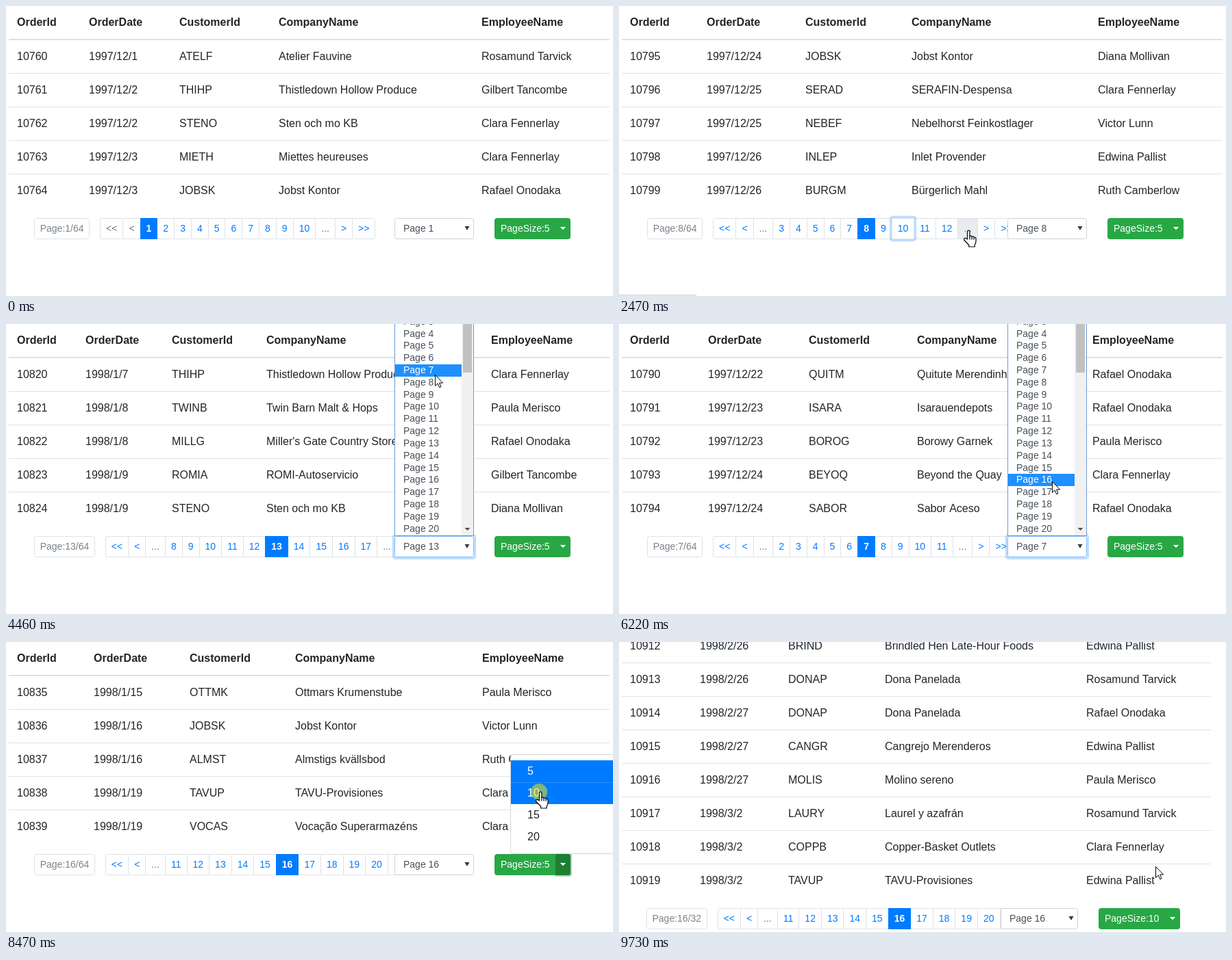
Recreate the animation shown at these times as an HTML page with a canvas. Size 886 by 424 pixels, loop 9.97 s.

```html
<!DOCTYPE html>
<html lang="en">
<head>
<meta charset="utf-8">
<title>Paged order table</title>
<style>
html, body { margin: 0; width: 100%; height: 100%; overflow: hidden; background: #fff; }
canvas { display: block; }
</style>
</head>
<body>
<canvas id="stage" width="886" height="424"></canvas>
<script>
const ctx = document.getElementById('stage').getContext('2d');
const LOOP = 9970;
const FONT = '"Liberation Sans", Arial, sans-serif';
const BLUE = '#007bff', LINE = '#dee2e6', INK = '#212529', GRAY = '#6c757d', FIELD = '#495057';

const STAFF = {
  R: 'Rosamund Tarvick', G: 'Gilbert Tancombe', C: 'Clara Fennerlay',
  O: 'Rafael Onodaka', E: 'Edwina Pallist', H: 'Ruth Camberlow',
  P: 'Paula Merisco', D: 'Diana Mollivan', V: 'Victor Lunn'
};
const HEADS = ['OrderId', 'OrderDate', 'CustomerId', 'CompanyName', 'EmployeeName'];

// Rows: date, customer code, company, employee key
const VIEWS = {
  p1: { page: 1, first: 10760, cols: [16, 121, 253, 398, 694], rows: [
    '1997/12/1|ATELF|Atelier Fauvine|R',
    '1997/12/2|THIHP|Thistledown Hollow Produce|G',
    '1997/12/2|STENO|Sten och mo KB|C',
    '1997/12/3|MIETH|Miettes heureuses|C',
    '1997/12/3|JOBSK|Jobst Kontor|O'] },
  p5: { page: 5, first: 10780, cols: [16, 122, 258, 405, 692], rows: [
    '1997/12/16|ROMIA|ROMI-Autoservicio|E',
    '1997/12/17|KUUSR|Kuusilan Ruoka|E',
    '1997/12/17|OMBUV|Ombú Viandas para el viaje|H',
    '1997/12/18|TUPIM|Tupira Massas|R',
    '1997/12/18|DISPC|Dispense Casalinghe Vallorti|R'] },
  p7: { page: 7, first: 10790, cols: [16, 130, 277, 435, 691], rows: [
    '1997/12/22|QUITM|Quitute Merendinhas|O',
    '1997/12/23|ISARA|Isarauendepots|O',
    '1997/12/23|BOROG|Borowy Garnek|P',
    '1997/12/24|BEYOQ|Beyond the Quay|C',
    '1997/12/24|SABOR|Sabor Aceso|O'] },
  p8: { page: 8, first: 10795, cols: [16, 128, 272, 427, 699], rows: [
    '1997/12/24|JOBSK|Jobst Kontor|D',
    '1997/12/25|SERAD|SERAFIN-Despensa|C',
    '1997/12/25|NEBEF|Nebelhorst Feinkostlager|V',
    '1997/12/26|INLEP|Inlet Provender|E',
    '1997/12/26|BURGM|Bürgerlich Mahl|H'] },
  p13: { page: 13, first: 10820, cols: [16, 116, 242, 380, 708], rows: [
    '1998/1/7|THIHP|Thistledown Hollow Produce|C',
    '1998/1/8|TWINB|Twin Barn Malt & Hops|P',
    "1998/1/8|MILLG|Miller's Gate Country Storehouses|O",
    '1998/1/9|ROMIA|ROMI-Autoservicio|G',
    '1998/1/9|STENO|Sten och mo KB|D'] },
  p16: { page: 16, first: 10835, cols: [16, 128, 268, 422, 695], rows: [
    '1998/1/15|OTTMK|Ottmars Krumenstube|P',
    '1998/1/16|JOBSK|Jobst Kontor|V',
    '1998/1/16|ALMST|Almstigs kvällsbod|H',
    '1998/1/19|TAVUP|TAVU-Provisiones|C',
    '1998/1/19|VOCAS|Vocação Superarmazéns|C'] },
  p16x10: { page: 16, first: 10910, size: 10, cols: [16, 118, 247, 388, 682], rows: [
    '1998/2/26|SAIMK|Saimen Keitto|P',
    '1998/2/26|MOROF|Moros Fogón Casero|C',
    '1998/2/26|BRIND|Brindled Hen Late-Hour Foods|E',
    '1998/2/26|DONAP|Dona Panelada|R',
    '1998/2/27|DONAP|Dona Panelada|O',
    '1998/2/27|CANGR|Cangrejo Merenderos|E',
    '1998/2/27|MOLIS|Molino sereno|P',
    '1998/3/2|LAURY|Laurel y azafrán|R',
    '1998/3/2|COPPB|Copper-Basket Outlets|C',
    '1998/3/2|TAVUP|TAVU-Provisiones|E'] }
};

// Each step changes part of the state and holds until the next
const START = { view: 'p1', cur: null, ring: -1, status: 0, focus: false, list: false, menu: false, scroll: 0 };
const STEPS = [
  [250, { cur: ['arrow', 300, 392] }],
  [490, { cur: ['hand', 308, 328], status: 1 }],
  [740, { cur: ['click', 308, 326], ring: 6 }],
  [980, { view: 'p5', cur: ['hand', 308, 326] }],
  [1230, { cur: ['hand', 340, 328] }],
  [1470, { cur: ['hand', 382, 326] }],
  [1730, { cur: ['click', 383, 325], ring: 9 }],
  [1980, { view: 'p8', cur: ['hand', 383, 325], ring: 10 }],
  [2230, { cur: ['arrow', 440, 352] }],
  [2470, { cur: ['hand', 508, 328] }],
  [2730, { cur: ['click', 510, 326], ring: 13 }],
  [2980, { view: 'p13', cur: ['hand', 510, 326] }],
  [3230, { cur: ['arrow', 590, 330] }],
  [3470, { cur: ['arrow', 646, 333], status: .4 }],
  [3730, { cur: ['arrow', 648, 325], ring: -1, status: 0, focus: true, list: true }],
  [3960, { cur: ['arrow', 640, 239] }],
  [4230, { cur: ['arrow', 630, 130] }],
  [4460, { cur: ['arrow', 626, 74] }],
  [4730, { view: 'p7', list: false }],
  [4980, { cur: ['arrow', 634, 170] }],
  [5230, { cur: ['arrow', 645, 321] }],
  [5480, { list: true }],
  [5720, { cur: ['arrow', 641, 290] }],
  [5980, { cur: ['arrow', 634, 246] }],
  [6220, { cur: ['arrow', 632, 230] }],
  [6470, { view: 'p16', list: false }],
  [6720, { cur: ['arrow', 655, 290] }],
  [6970, { cur: ['arrow', 690, 336] }],
  [7210, { cur: ['arrow', 745, 336] }],
  [7460, { cur: ['hand', 808, 328] }],
  [7710, { cur: ['click', 812, 326], focus: false, menu: true }],
  [7960, { cur: ['hand', 806, 290] }],
  [8210, { cur: ['hand', 782, 228] }],
  [8470, { cur: ['click', 778, 219] }],
  [8720, { view: 'p16x10', cur: ['arrow', 778, 219], menu: false }],
  [8960, { cur: ['arrow', 780, 260] }],
  [9200, { cur: ['arrow', 782, 300], scroll: 100 }],
  [9470, { scroll: 166 }],
  [9730, { cur: ['arrow', 783, 328] }]
];

function stateAt(t) {
  const s = { ...START };
  for (const [at, change] of STEPS) if (t >= at) Object.assign(s, change);
  return s;
}

function text(str, x, y, color = INK, size = 16, bold = false) {
  ctx.font = `${bold ? 'bold ' : ''}${size}px ${FONT}`;
  ctx.fillStyle = color;
  ctx.fillText(str, x, y);
}

function width(str) {
  ctx.font = `14px ${FONT}`;
  return ctx.measureText(str).width;
}

function rect(x, y, w, h, color) {
  ctx.fillStyle = color;
  ctx.fillRect(x, y, w, h);
}

function box(x, y, w, h, fill, border, radius = 0) {
  ctx.beginPath();
  ctx.roundRect(x + .5, y + .5, w - 1, h - 1, radius);
  ctx.fillStyle = fill;
  ctx.fill();
  ctx.lineWidth = 1;
  ctx.strokeStyle = border;
  ctx.stroke();
}

function glow(x, y, w, h, color, spread = 3.2) {
  ctx.beginPath();
  ctx.roundRect(x - spread / 2, y - spread / 2, w + spread, h + spread, 3);
  ctx.lineWidth = spread;
  ctx.strokeStyle = color;
  ctx.stroke();
}

function caret(x, y, half, h, color) {
  ctx.beginPath();
  ctx.moveTo(x - half, y);
  ctx.lineTo(x + half, y);
  ctx.lineTo(x, y + h);
  ctx.fillStyle = color;
  ctx.fill();
}

function drawTable(v) {
  const w = v.size ? 860 : 877;
  HEADS.forEach((h, i) => text(h, v.cols[i], 29, INK, 16, true));
  rect(4, 48, w, 2, LINE);
  v.rows.forEach((row, i) => {
    const [date, code, company, key] = row.split('|');
    const y = 79 + 49 * i;
    [String(v.first + i), date, code, company, STAFF[key]].forEach((c, k) => text(c, v.cols[k], y));
    if (i) rect(4, 49 + 49 * i, w, 1, LINE);
  });
}

function pagerLabels(page) {
  const from = Math.max(1, page - 5);
  const nums = Array.from({ length: 10 }, (_, i) => String(from + i));
  return ['<<', '<', ...(from > 1 ? ['...'] : []), ...nums, '...', '>', '>>'];
}

function pagerItems(page, x) {
  return pagerLabels(page).map(label => {
    const w = width(label) + 18;
    const left = Math.round(x), right = Math.round(x + w);
    const item = { label, tx: x + 9, x: left, w: right - left };
    x += w - 1;
    return item;
  });
}

function drawItem(it, y, s, v, cursorY) {
  const off = v.page === 1 && it.label[0] === '<';
  const active = it.label === String(v.page);
  const over = s.cur && s.cur[0] !== 'arrow' && !s.menu &&
    s.cur[1] >= it.x && s.cur[1] < it.x + it.w && cursorY >= y && cursorY < y + 31;
  const fill = active ? BLUE : over ? '#e9ecef' : '#fff';
  box(it.x, y, it.w, 31, fill, active ? BLUE : LINE, /<<|>>/.test(it.label) ? 2 : 0);
  const color = active ? '#fff' : off || it.label === '...' ? GRAY : BLUE;
  text(it.label, it.tx, y + 20, color, 14, active);
}

function drawControls(s, v) {
  const big = !!v.size;
  const y = big ? 555 : 310;
  const x = big ? 39.8 : 41;
  const info = `Page:${v.page}/${big ? 32 : 64}`;
  const infoW = width(info) + 18;
  const cursorY = s.cur ? s.cur[2] + s.scroll : -1;
  box(Math.round(x), y, Math.floor(infoW), 31, '#fff', LINE, 3);
  text(info, x + 8.7, y + 20, '#7b838a', 14);

  const items = pagerItems(v.page, x + infoW + 14.2);
  items.forEach(it => drawItem(it, y, s, v, cursorY));
  const active = items.find(it => it.label === String(v.page));
  drawItem(active, y, s, v, cursorY);

  const sx = big ? 557 : 567, sw = big ? 113 : 116;
  box(sx, y, sw, 31, '#fff', s.focus ? '#80bdff' : '#ced4da', 3);
  if (s.focus) glow(sx, y, sw, 31, 'rgba(0,123,255,.25)');
  text('Page ' + v.page, sx + 13, y + 20, FIELD, 14);
  caret(sx + sw - 10, y + 12, 3.5, 6, '#343a40');

  const ringed = items[s.ring];
  if (ringed) {
    drawItem(ringed, y, s, v, cursorY);
    glow(ringed.x, y, ringed.w, 31, 'rgba(0,123,255,.25)');
  }

  const bx = big ? 700 : 713, bw = big ? 119 : 111, tx = bx + bw - 22;
  box(bx, y, bw, 31, '#28a745', '#28a745', 3);
  const overToggle = s.cur && s.cur[0] === 'hand' && s.cur[1] > tx && cursorY > y;
  if (s.menu || overToggle) {
    const c = s.menu ? '#1e7e34' : '#218838';
    box(tx, y, 22, 31, c, c, 2);
    if (s.menu) glow(tx, y, 22, 31, 'rgba(40,167,69,.4)', 2);
  }
  text('PageSize:' + (big ? 10 : 5), bx + 9, y + 20, '#fff', 14);
  caret(bx + bw - 11, y + 13, 4.2, 4.2, '#fff');
}

function drawList(s, v) {
  const pitch = 17.81;
  const rowTop = n => 5.6 + pitch * (n - 4);
  const cy = s.cur[2];
  const hot = cy < 309 ? Math.floor((cy - 5.6) / pitch) + 4 : v.page;
  box(567, -2, 116, 312, '#fff', '#6c9bd2');
  for (let n = 3; n <= 20; n++) {
    const top = Math.round(rowTop(n));
    if (n === hot) rect(568, top, 97, 18, '#1e90ff');
    text('Page ' + n, 580, top + 13, n === hot ? '#fff' : FIELD, 14);
  }
  rect(665, 0, 17, 309, '#f1f1f1');
  rect(667, 0, 13, 71, '#c1c1c1');
  caret(673.5, 298, 4, 4, '#505050');
}

function drawMenu(s) {
  box(736, 164, 162, 146, '#fff', '#d4d4d4', 4);
  const [kind, , cy] = s.cur;
  ['5', '10', '15', '20'].forEach((label, i) => {
    const top = 173 + 32 * i;
    const over = cy >= top && cy < top + 32;
    const blue = i === 0 || (over && kind === 'click');
    if (blue) rect(737, top, 149, 32, BLUE);
    else if (over) rect(737, top, 149, 32, '#f8f9fa');
    if (blue && i) rect(737, top, 149, 1, '#2a8fff');
    text(label, 761, top + 21, blue ? '#fff' : INK);
  });
}

const ARROW = new Path2D('M.5 .5V16.5L4.2 13L6.7 18.8L9 17.8L6.6 12.1H11.6Z');
const HAND = new Path2D('M.5 13V2Q.5 .2 2.2 .2T3.9 2V8.5Q6.4 7.4 7 9.2Q9.5 8.4 10 10.2Q13 9.8 13 12.5V16Q13 19 11.2 21V24H2.7V21.5L-4 14.5Q-5.2 11 -2.3 11.3Z');
const FINGERS = new Path2D('M3.9 8.5V13.5M7 9.2V13.5M10 10.2V13.8');

function drawCursor([kind, x, y]) {
  if (kind === 'click') {
    ctx.beginPath();
    ctx.arc(x, y, 12, 0, Math.PI * 2);
    ctx.fillStyle = 'rgba(255,240,0,.5)';
    ctx.fill();
  }
  ctx.save();
  ctx.translate(x, y);
  const shape = kind === 'arrow' ? ARROW : HAND;
  ctx.fillStyle = '#fff';
  ctx.strokeStyle = '#000';
  ctx.lineWidth = kind === 'arrow' ? 1 : 1.2;
  ctx.lineJoin = 'round';
  ctx.fill(shape);
  ctx.stroke(shape);
  if (kind !== 'arrow') ctx.stroke(FINGERS);
  ctx.restore();
}

function drawStatus(alpha) {
  ctx.globalAlpha = alpha;
  rect(0, 422, 113, 1, '#d0d0d0');
  rect(0, 423, 114, 1, '#f1f1f1');
  ctx.globalAlpha = 1;
}

function draw(t) {
  const s = stateAt(t);
  const v = VIEWS[s.view];
  rect(0, 0, 886, 424, '#fff');
  ctx.save();
  ctx.translate(0, -s.scroll);
  drawTable(v);
  drawControls(s, v);
  ctx.restore();
  if (s.list) drawList(s, v);
  if (s.menu) drawMenu(s);
  drawStatus(s.status);
  if (s.cur) drawCursor(s.cur);
}

const begin = performance.now();
function tick() {
  draw((performance.now() - begin) % LOOP);
  requestAnimationFrame(tick);
}
tick();
</script>
</body>
</html>
```
